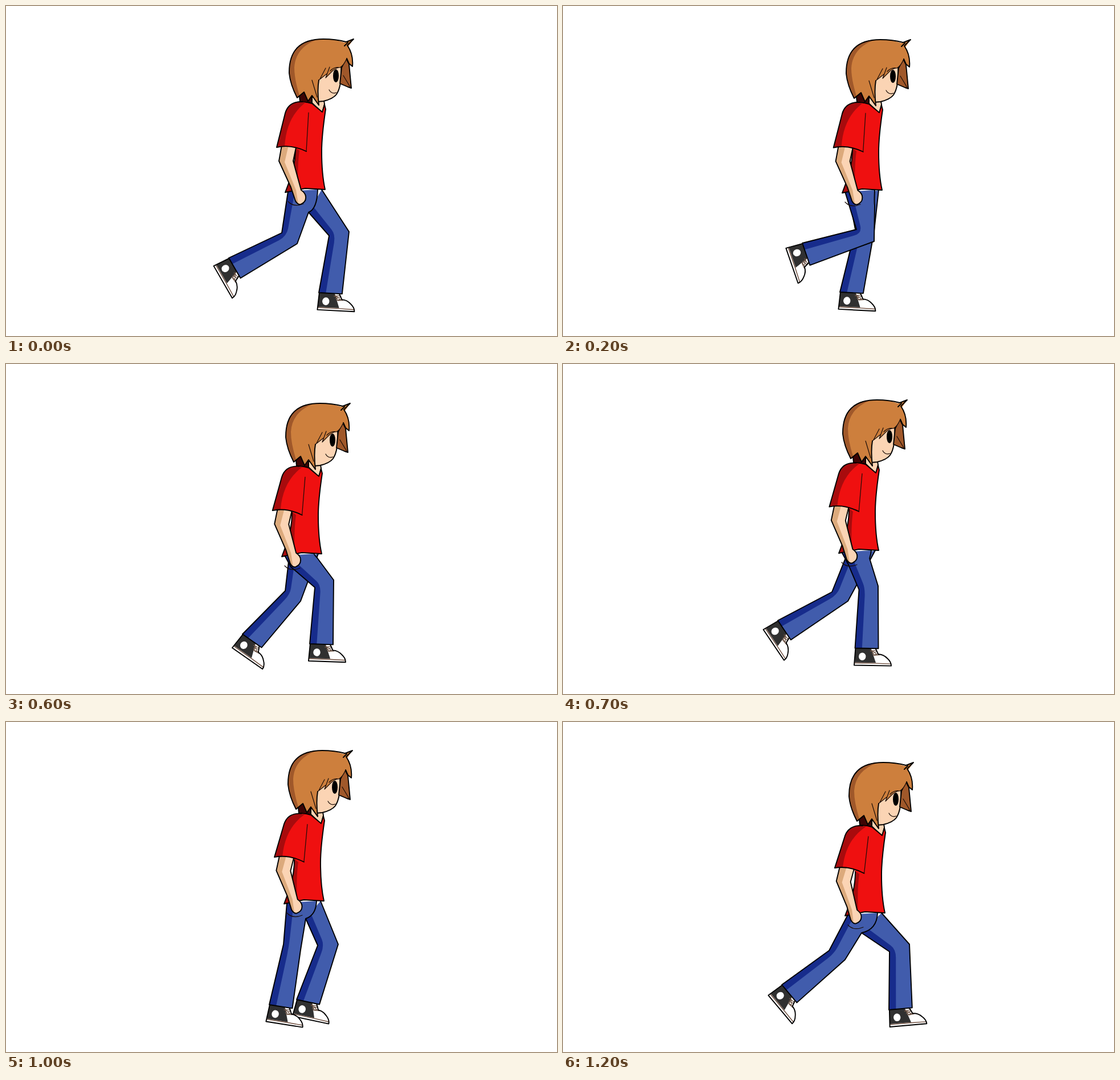
An HTML page that plays this animation: 967x579 px, repeating every 1.3 s.

```html
<!DOCTYPE html>
<html lang="en">
<head>
<meta charset="utf-8">
<title>Walk cycle</title>
<style>
  html, body { margin: 0; width: 100%; height: 100%; overflow: hidden; background: #fff; }
  svg { display: block; width: 967px; height: 579px; }
  path, g { stroke-linejoin: round; stroke-linecap: round; }
  .line { fill: none; stroke: #000; stroke-width: 1.9; }
  .thin { fill: none; stroke: #1a0d08; stroke-width: 1.2; }
  .denim { fill: #415cac; }
  .denim-shade { fill: #172c8c; }
  .red { fill: #ef1010; }
  .red-shade { fill: #a80b0d; }
  .skin { fill: #fbd4b4; }
  .skin-shade { fill: #dcaa7c; }
  .hair { fill: #cd7f3d; }
  .hair-shade { fill: #a0582a; }
  .edge { stroke: #000; stroke-width: 1.9; }
</style>
</head>
<body>
<svg viewBox="0 0 967 579">
  <defs>
    <g id="shoe">
      <path fill="#fff" d="M1 -2 L-1 30 L64 30 Q64 23 57 17 Q50 10 41 10 L36 0 Z"/>
      <path fill="#303030" d="M1 -2 L28 0 L37 25 L0 25 Z"/>
      <path d="M28 2 L34 12 L43 11 M27 5 L38 3 M30 9 L39 5 M32 12 L41 9 M30 4 L37 9" fill="none" stroke="#6b5142" stroke-width="1.3"/>
      <path d="M0 26 L36 26 L63 26.5" fill="none" stroke="#6b4a3a" stroke-width="1.4"/>
      <ellipse cx="13" cy="14.5" rx="6.2" ry="6.8" fill="#fff"/>
      <path class="line" d="M1 -2 L-1 30 L64 30 Q64 23 57 17 Q50 10 41 10 L36 0 Z"/>
    </g>
  </defs>

  <g id="far"></g>
  <g id="near"></g>

  <g id="body">
    <path id="pocket" class="thin" d="M495 343 Q505 354 522 347"/>

    <!-- neck and torso -->
    <path fill="#3d0504" class="edge" d="M514 150 L516 168 L537 171 L540 152 Z"/>
    <path class="skin edge" d="M537 160 L537 170 L555 187 L559 172 L557 160 Z"/>
    <path class="red" d="M513 169 Q525 167 537 171 L555 186 L559 173 L561 181 Q554 228 554 255 Q554 295 560 322 L525 320 L490 327 L496 311 Q508 280 508 250 L500 200 Z"/>
    <path class="red-shade" d="M505 246 L515 254 Q511 280 513 322 L490 327 L496 311 Q508 280 508 250 Z"/>
    <path class="line" d="M513 169 Q525 167 537 171 L555 186 L559 173 L561 181 Q554 228 554 255 Q554 295 560 322 L525 320 L490 327 L496 311 Q508 280 508 250"/>

    <g id="arm">
      <path class="skin" d="M484 244 L479 272 L500 318 L508 342 Q512 349 517 348 Q526 344 526 337 Q527 329 518 323 L504 272 L509 248 Z"/>
      <path class="skin-shade" d="M484 244 L479 272 L500 318 L508 342 L513 347 L509 323 L489 274 L496 244 Z"/>
      <path class="line" d="M484 244 L479 272 L500 318 L508 342 Q512 349 517 348 Q526 344 526 337 Q527 329 518 323 L504 272 L509 248"/>
      <path class="red" d="M524 169 Q496 166 490 188 L475 248 Q500 242 527 255 L531 187 Z"/>
      <path class="red-shade" d="M526 169 Q496 166 490 188 L475 248 L489 246 Q492 195 526 169 Z"/>
      <path class="line" d="M520 168 Q496 167 490 188 L475 248 Q500 242 527 255"/>
      <path class="thin" d="M527 255 L531 187"/>
    </g>

    <!-- head -->
    <path class="skin edge" d="M545 110 L588 104 Q590 140 580 155 Q574 163 557 167 L546 168 Z"/>
    <ellipse cx="579" cy="122.5" rx="5" ry="11.5"/>
    <path class="thin" d="M567 147 Q571 155 580 152"/>
    <path class="hair-shade edge" d="M597 92 L602 102 L606 144 L600 142 L586 136 L589 108 Z"/>
    <path class="thin" d="M592 122 L604 142"/>
    <path class="hair" d="M594 64 L610 58 L601 71 Q610 85 608 106 L602 101 L598 92 Q593 104 586 108 Q580 108 574 113 L561 126 L563 119 L549 130 Q546 147 549 174 L537 157 L530 167 L523 151 L511 161 Q499 138 497 118 Q496 58 557 58 Q578 58 594 64 Z"/>
    <path class="hair-shade" d="M548 58 Q496 61 497 118 Q499 138 511 161 L515 157 Q506 128 506 108 Q508 72 548 58 Z"/>
    <path class="line" d="M594 70 L600 64 M549 130 Q546 147 549 174 L537 157 L530 167 L523 151 L511 161 Q499 138 497 118 Q496 58 557 58 Q578 58 597 63 L610 58 L599 69 Q610 85 608 106 L602 101 L598 92"/>
    <path class="thin" d="M598 92 Q593 104 586 108 Q580 108 574 113 L561 126 L568 107 M549 130 L563 119 M561 109 L551 128 M586 108 Q576 106 569 114 M537 130 L546 160"/>
  </g>
</svg>
<script>
const STEP = 100, COUNT = 13;

// Leg: knee back x,y, knee front x,y, ankle back x,y, ankle angle.
const pose = (body, arm, crotch, near, far) => ({ body, arm: [arm], crotch, near, far });
const keys = [
  pose([0, 0], 0, [531, 362], [484, 398, 511, 417, 391, 442, 60], [567, 403, 602, 396, 549, 503, 3]),
  pose([0, 1], .3, [547, 350], [515, 392, 546, 413, 420, 416, 71], [513, 392, 546, 395, 486, 502, 3]),
  pose([0, 4], 1, [540, 336], [534, 398, 567, 392, 502, 494, 13], [499, 400, 535, 405, 472, 496, 6]),
  pose([-6, 11], 1.2, [546, 340], [542, 392, 575, 379, 533, 491, 2], [490, 398, 517, 416, 415, 474, 35]),
  pose([-6, -1], 1.8, [530, 342], [497, 400, 531, 400, 492, 506, 0], [505, 386, 529, 408, 417, 451, 44]),
  pose([-2, -8], 1.8, [526, 345], [487, 390, 517, 400, 462, 496, 9], [547, 392, 583, 390, 510, 487, 12]),
  pose([5, 13], 3, [524, 370], [467, 401, 495, 417, 384, 461, 50], [573, 403, 608, 390, 572, 505, -5])
];

// Steps where a leg swings wider than the halfway pose.
const swings = {
  1: { body: [0, -1], near: [484, 396, 513, 414, 385, 429, 68] },
  5: { near: [553, 388, 588, 374, 554, 494, -2] },
  7: { far: [472, 400, 500, 416, 377, 450, 56] }
};

const mix = (a, b, t) => a.map((v, i) => v + (b[i] - v) * t);
const shift = (p, x, y) => [p[0] + x, p[1] + y];
const at = id => document.getElementById(id);
const line = pts => pts.map(p => p.map(v => v.toFixed(1)).join(' ')).join(' L');

function poseAt(i) {
  const a = keys[i >> 1];
  if (i % 2 === 0) return a;
  const b = keys[(i >> 1) + 1], out = {};
  for (const k in a) out[k] = mix(a[k], b[k], .5);
  return Object.assign(out, swings[i]);
}

// hips: points down the back of the hip; inner: where its shade starts; front: path from knee to waist.
function leg(data, hips, inner, front) {
  const kneeB = data.slice(0, 2), kneeF = data.slice(2, 4), ankleB = data.slice(4, 6), angle = data[6];
  const r = angle * Math.PI / 180;
  const ankleF = shift(ankleB, 41 * Math.cos(r), 41 * Math.sin(r));
  const outline = `M${line([...hips, kneeB, ankleB, ankleF, kneeF])} ${front}`;
  const bend = mix(kneeB, kneeF, .32), hem = mix(ankleB, ankleF, .3);
  const shade = `M${line([...hips, kneeB, ankleB, hem, mix(bend, hem, .14)])} Q${line([bend])} ${line([mix(bend, inner, .18)])} L${line([inner])} Z`;
  return `<use href="#shoe" transform="translate(${ankleB}) rotate(${angle})"/>
    <path class="denim" d="${outline} Z"/><path class="denim-shade" d="${shade}"/><path class="line" d="${outline}"/>`;
}

function draw(p) {
  const [x, y] = p.body, c = p.crotch;
  const waistB = [495 + x, 325 + y], waistF = [547 + x, 322 + y], farF = [554 + x, 322 + y];

  const ahead = p.far[0] > c[0];
  const farHip = ahead ? c : shift(waistB, 7, 10);
  const farInner = ahead ? shift(c, 9, -9) : shift(farHip, 11, 0);
  at('far').innerHTML = leg(p.far, [farHip], farInner, `L${line([farF])}`);

  const bent = p.near[0] > waistB[0] + 25;
  const hip = shift(waistB, 11, 20);
  const hips = bent ? [waistB, hip] : [waistB];
  const nearInner = bent ? shift(hip, 9, -8) : shift(waistB, 12, 0);
  const fly = `L${line([c])} Q${line([[waistF[0] - 1, c[1] - 6]])} ${line([waistF])}`;
  at('near').innerHTML = leg(p.near, hips, nearInner, fly);

  const tilt = p.arm[0];
  at('body').setAttribute('transform', `translate(${x} ${y})`);
  at('arm').setAttribute('transform',
    `translate(513 185) rotate(${tilt}) scale(1 ${1 - tilt * .015}) translate(-513 -185)`);
}

let shown = -1;
function tick() {
  const i = Math.floor(performance.now() / STEP) % COUNT;
  if (i !== shown) draw(poseAt(shown = i));
  requestAnimationFrame(tick);
}
tick();
</script>
</body>
</html>
```
